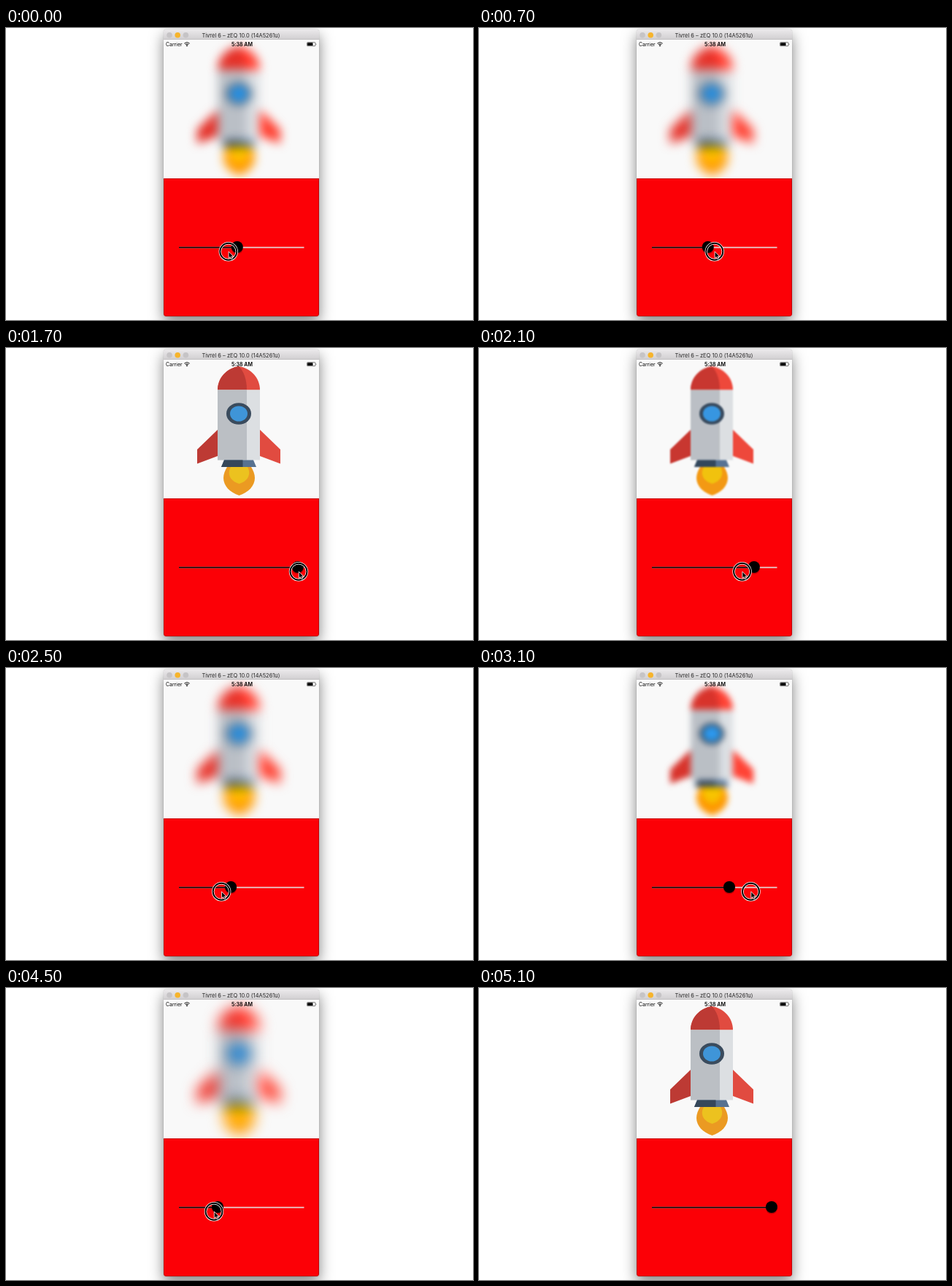
Animation, 640 px wide and 400 px high, one loop 5200 ms. Source, as an HTML page:

```html
<!DOCTYPE html>
<html lang="en">
<head>
<meta charset="utf-8">
<title>Blur slider</title>
<style>
  html, body { margin: 0; width: 100%; height: 100%; overflow: hidden; background: #fff; }
  #stage { position: relative; width: 640px; height: 400px; overflow: hidden; background: #fff; }
  #window {
    position: absolute; left: 216px; top: 2px; width: 213px; height: 393px;
    border-radius: 4px 4px 3px 3px; overflow: hidden;
    box-shadow: 0 0 1px rgba(0, 0, 0, .45), 0 8px 19px rgba(0, 0, 0, .5);
  }
  #bar { height: 14px; box-sizing: border-box; background: linear-gradient(#ebe9eb, #d2d0d2); border-bottom: 1px solid #c2c0c2; }
  #photo { position: relative; height: 190px; background: #f9f9f9; overflow: hidden; }
  #panel { height: 189px; background: #fc0006; box-shadow: inset 0 0 0 1px rgba(70, 0, 0, .3); border-radius: 0 0 3px 3px; }
  #rocket { position: absolute; left: 0; top: 0; width: 213px; height: 190px; overflow: visible; }
  #front { position: absolute; left: 0; top: 0; }
  text { font-family: Inter, "Liberation Sans", sans-serif; }
</style>
</head>
<body>
<div id="stage">
  <div id="window">
    <div id="bar"></div>
    <div id="photo">
      <svg id="rocket" viewBox="216 16 213 190">
        <g fill="#e14b40">
          <path d="M290 57.5C290 41 302 28 319 25C336 28 348 41 348 57.5Z"/>
          <path id="fin" d="M290 112L262 139V158.5L290 148Z" transform="matrix(-1 0 0 1 638 0)"/>
        </g>
        <g fill="#bd3a34">
          <path d="M290 57.5C290 41 302 28 319 25C326 32 330 43 330 57.5Z"/>
          <path d="M290 112L262 139V158.5L290 148Z"/>
        </g>
        <rect x="290" y="57.5" width="58" height="96" fill="#dcdfe2"/>
        <rect x="290" y="57.5" width="40" height="96" fill="#bbbfc4"/>
        <ellipse cx="319" cy="90" rx="17" ry="14.7" fill="#3a4b5d"/>
        <ellipse cx="319" cy="90" rx="12" ry="10.5" fill="#3f95d8"/>
        <path fill="#eb9a22" d="M303 163C300 168 298 173 298 178C298 189 307 198 319.5 202C332 198 341 189 341 178C341 173 339 168 336 163Z"/>
        <path fill="#ecc21f" d="M308 163C302 174 309 183 319.5 186C330 183 337 174 331 163Z"/>
        <path fill="#587290" d="M299 153.5H339L343 163H295Z"/>
        <path fill="#35475a" d="M299 153.5H324.5V163H295Z"/>
      </svg>
    </div>
    <div id="panel"></div>
  </div>
  <svg id="front" width="640" height="400" viewBox="0 0 640 400">
    <g id="lights"></g>
    <text x="322" y="12.6" font-size="7.5" text-anchor="middle" fill="#262626">Tivrel 6 – zEQ 10.0 (14A5261u)</text>

    <text x="219" y="24.6" font-size="6.9">Carrier</text>
    <text x="323.5" y="24.6" font-size="7.1" font-weight="600" text-anchor="middle">5:38 AM</text>
    <g fill="none" stroke="#111" stroke-width="1.1">
      <path d="M244.5 21.3Q248 18.3 251.5 21.3M246 22.9Q248 21.2 250 22.9"/>
      <circle cx="248" cy="24.2" r=".4"/>
    </g>
    <rect x="412.5" y="19.7" width="11.5" height="5" rx="1" fill="none" stroke="#222" stroke-width=".6"/>
    <rect x="413.2" y="20.3" width="7.3" height="3.8" rx=".4"/>
    <path d="M424.8 21.2Q426 22.2 424.8 23.2Z"/>

    <g stroke-width="1.6">
      <path d="M237 300.6H408.5" stroke="#e6d2d0"/>
      <path id="fill" stroke="#100"/>
    </g>
    <g id="thumb">
      <circle cy="1.3" r="8.3" opacity=".25"/>
      <circle r="8"/>
    </g>
    <g id="pointer">
      <g fill="none">
        <circle r="11.5" stroke="#fff" stroke-width="3.4"/>
        <circle r="11.5" stroke="#000" stroke-width="1.9"/>
      </g>
      <path d="M.3 0V9L2.5 7.2L4 10.4L5.6 9.7L4.2 6.6H7Z" stroke="#fff" stroke-width=".8"/>
    </g>
  </svg>
</div>
<script>
  const LOOP = 5200, STEP = 100, HIDE = 5100;
  const MIN = 245, MAX = 401;

  // where the hand turns or rests: time, x
  const turns = [
    [-500, 355], [180, 295], [1700, 401], [2700, 284],
    [3300, 402], [3750, 402], [4500, 285], [5000, 402]
  ];

  const $ = id => document.getElementById(id);
  const clamp = (v, lo, hi) => Math.min(hi, Math.max(lo, v));
  const ease = u => (1 - Math.cos(Math.PI * u)) / 2;
  const move = (el, x, y) => el.setAttribute('transform', `translate(${x.toFixed(2)} ${y})`);

  $('lights').innerHTML = ['#c6c4c6', '#f6b42c', '#c6c4c6']
    .map((c, i) => `<circle cx="${224 + 11.2 * i}" cy="9.8" r="3.8" fill="${c}"/>`).join('');

  function handX(t) {
    const next = turns.findIndex(p => p[0] > t);
    if (next < 0) return turns[turns.length - 1][1];
    const [t0, x0] = turns[next - 1], [t1, x1] = turns[next];
    return x0 + (x1 - x0) * ease((t - t0) / (t1 - t0));
  }

  function draw(t) {
    // the thumb trails the pointer by one step
    const x = clamp(handX(t - STEP), MIN, MAX);
    const soft = (MAX - x) / (MAX - MIN);
    move($('thumb'), x, 300);
    $('fill').setAttribute('d', `M237 300.6H${x}`);
    move($('pointer'), handX(t), 306.3);
    $('pointer').style.display = t >= HIDE ? 'none' : '';
    $('rocket').style.filter = soft < .02 ? 'none'
      : `blur(${17 * soft ** 1.45}px) saturate(${1 + .7 * soft})`;
  }

  const start = performance.now();
  function tick() {
    const t = (performance.now() - start) % LOOP;
    draw(Math.floor(t / STEP) * STEP);
    requestAnimationFrame(tick);
  }
  tick();
</script>
</body>
</html>
```
